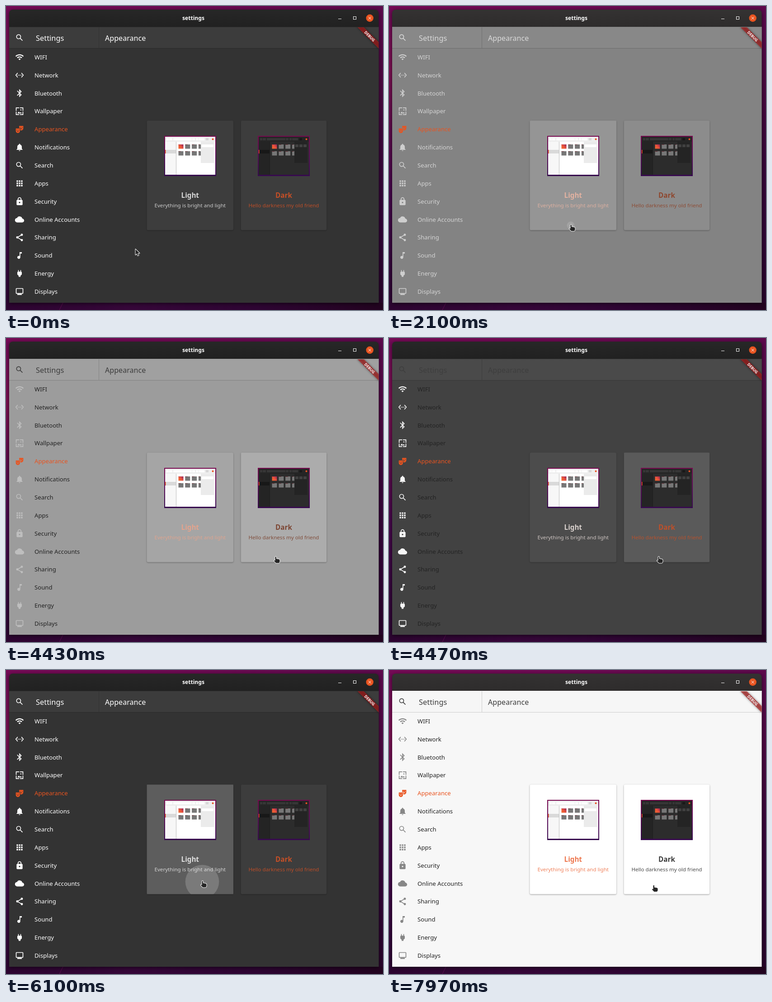
Recreate the animation shown at these times as an HTML page with a canvas. Size 834 by 672 pixels, loop 8 s.

```html
<!DOCTYPE html>
<html lang="en">
<head>
<meta charset="utf-8">
<title>settings</title>
<style>
html, body { margin: 0; width: 100%; height: 100%; overflow: hidden; background: #2a0430; }
canvas { display: block; width: 834px; height: 672px; }
</style>
</head>
<body>
<canvas id="stage" width="834" height="672"></canvas>
<script>
const ctx = document.getElementById('stage').getContext('2d');
const LOOP = 8000;
const SCALE = 0.83;
const ORANGE = [233, 84, 32];
const FONT = '"Noto Sans", "Open Sans", sans-serif';

// Icons on a 24-unit grid: stroked path, filled path
const icons = {
  search: ['M15 9.5a5.5 5.5 0 1 0-11 0a5.5 5.5 0 1 0 11 0M13.6 13.6L19.8 19.8', ''],
  wifi: ['', 'M1 9l2 2c4.97-4.97 13.03-4.97 18 0l2-2C16.93 2.93 7.08 2.93 1 9zM9 17l3 3 3-3c-1.65-1.66-4.34-1.66-6 0zM5 13l2 2c2.76-2.76 7.24-2.76 10 0l2-2C15.14 9.14 8.87 9.14 5 13z'],
  network: ['M7 6.1L2.1 12L7 17.9M17 6.1L21.9 12L17 17.9M7 12h2m2 0h2m2 0h2', ''],
  bluetooth: ['M5.7 5.7L16.3 16.3L12 20.6V3.4L16.3 7.7L5.7 18.3', ''],
  wallpaper: ['M3 11V3h8M13 3h8v8M21 13v8h-8M11 21H3v-8', 'M10 13l-4 5h12l-3-4-2 2.7zM17 8.5a1.5 1.5 0 1 0-3 0a1.5 1.5 0 1 0 3 0'],
  masks: ['', 'M2 10h11v6.5a5.5 5.5 0 0 1-11 0zM5 17a2.5 1.5 0 0 0 5 0zM4 14a1 1 0 1 0 2 0a1 1 0 1 0-2 0M9 14a1 1 0 1 0 2 0a1 1 0 1 0-2 0' +
    'M11 3h11v6.5a5.5 5.5 0 0 1-8 4.9V9h-3zM14 11.5h5a2.5 1.5 0 0 0-5 0M13 7a1 1 0 1 0 2 0a1 1 0 1 0-2 0M18 7a1 1 0 1 0 2 0a1 1 0 1 0-2 0'],
  bell: ['', 'M10 20h4a2 2 0 0 1-4 0M18 16v-5c0-3.1-1.6-5.6-4.5-6.3V4a1.5 1.5 0 0 0-3 0v.7C7.6 5.4 6 7.9 6 11v5l-2 2v1h16v-1z'],
  apps: ['', [4, 10, 16].map(x => [4, 10, 16].map(y => `M${x} ${y}h4v4h-4z`).join('')).join('')],
  lock: ['M8 9V6a4 4 0 0 1 8 0v3', 'M6 8h12a2 2 0 0 1 2 2v10a2 2 0 0 1-2 2H6a2 2 0 0 1-2-2V10a2 2 0 0 1 2-2zM10 15a2 2 0 1 0 4 0a2 2 0 1 0-4 0'],
  cloud: ['', 'M19.4 10A7.5 7.5 0 0 0 5.4 8A6 6 0 0 0 6 20h13a5 5 0 0 0 .4-10z'],
  share: ['M18 5L6 12L18 19', [[18, 5], [6, 12], [18, 19]].map(([x, y]) => `M${x - 3} ${y}a3 3 0 1 0 6 0a3 3 0 1 0-6 0`).join('')],
  note: ['', 'M12 3v10.55a4 4 0 1 0 2 3.45V7h4V3z'],
  plug: ['', 'M16 7V3h-2v4h-4V3H8v4a2 2 0 0 0-2 2v5.5L9.5 18v3h5v-3l3.5-3.5V9a2 2 0 0 0-2-2z'],
  display: ['M4 4h16a1 1 0 0 1 1 1v11a1 1 0 0 1-1 1H4a1 1 0 0 1-1-1V5a1 1 0 0 1 1-1z', 'M7 18l-1 1v2h12v-2l-1-1z']
};
for (const name in icons) icons[name] = icons[name].map(d => new Path2D(d));

const rows = [
  ['wifi', 'WIFI'], ['network', 'Network'], ['bluetooth', 'Bluetooth'], ['wallpaper', 'Wallpaper'],
  ['masks', 'Appearance'], ['bell', 'Notifications'], ['search', 'Search'], ['apps', 'Apps'],
  ['lock', 'Security'], ['cloud', 'Online Accounts'], ['share', 'Sharing'], ['note', 'Sound'],
  ['plug', 'Energy'], ['display', 'Displays']
];

const arrow = new Path2D('M0 0V12.5L3 9.8L5 14.5L7 13.6L5 9H9z');
const hand = new Path2D('M3 8.5V1.5q1.2-1.6 2.4 0V5.5L11 6.5q2 .5 2 2V11q0 4-3 4H5.5q-1 0-2-1.5L.5 10.2q-.3-2 2.5-.8z');

// Keys are [time, value] pairs, held at both ends
function track(t, keys, ease = u => u) {
  if (t < keys[0][0]) return keys[0][1];
  for (let i = 1; i < keys.length; i++) {
    const [t0, v0] = keys[i - 1], [t1, v1] = keys[i];
    if (t < t1) return v0 + (v1 - v0) * ease((t - t0) / (t1 - t0));
  }
  return keys[keys.length - 1][1];
}
const smooth = u => u * u * (3 - 2 * u);
const rgb = (c, a = 1) => `rgba(${c.map(Math.round).join(',')},${a})`;
const gray = (v, a) => rgb([v, v, v], a);
const mix = (a, b, u) => a + (b - a) * u;
const mixRgb = (a, b, u) => a.map((v, i) => mix(v, b[i], u));

function rect(x, y, w, h, fill) {
  ctx.fillStyle = fill;
  ctx.fillRect(x, y, w, h);
}
function disc(x, y, r, fill) {
  ctx.fillStyle = fill;
  ctx.beginPath();
  ctx.arc(x, y, r, 0, 7);
  ctx.fill();
}
function gradient(x0, y0, x1, y1, ...colors) {
  const g = ctx.createLinearGradient(x0, y0, x1, y1);
  colors.forEach((c, i) => g.addColorStop(i / (colors.length - 1), c));
  return g;
}
function text(str, x, y, size, fill, weight = 400, align = 'left') {
  ctx.font = `${weight} ${size}px ${FONT}`;
  ctx.textAlign = align;
  ctx.fillStyle = fill;
  ctx.fillText(str, x, y);
}
function icon(name, cx, cy, color) {
  const [line, solid] = icons[name];
  ctx.save();
  ctx.translate(cx, cy);
  ctx.scale(SCALE, SCALE);
  ctx.translate(-12, -12);
  ctx.strokeStyle = ctx.fillStyle = color;
  ctx.lineWidth = 2;
  ctx.stroke(line);
  ctx.fill(solid, 'evenodd');
  ctx.restore();
}

// dark: surface blend, ink: text blend (1 = dark theme)
function stateAt(t) {
  const late = t >= 7370;
  const held = late && t < 7470;
  return {
    dark: late ? (held ? 0.35 : 0) : track(t, [[2040, 1], [2100, 0.6], [2170, 0.1], [2200, 0], [4400, 0], [4430, 0.45], [4470, 0.92], [4500, 1]]),
    ink: late ? (held ? 0.9 : 0) : track(t, [[2070, 1], [2230, 0], [4470, 0], [4670, 1]]),
    bar: t < 2070 || (t >= 4430 && t < 7370),
    hoverLight: track(t, [[1130, 0], [1230, 1], [2700, 1], [2790, 0], [5290, 0], [5390, 1], [7830, 1], [7970, 0]]),
    hoverDark: track(t, [[2770, 0], [2870, 1], [5200, 1], [5310, 0]]),
    press: track(t, [[5900, 0], [6100, 0.085], [6500, 0.15], [7370, 0.15], [7470, 0]])
  };
}

function drawWallpaper() {
  rect(0, 0, 834, 672, gradient(0, 0, 834, 0, '#740a55', '#6c0a52', '#5c094b'));
  rect(0, 8, 400, 664, gradient(0, 8, 0, 672, '#6e0a55', '#7a0f50', '#5c0a4a', '#45064a', '#36063d', '#2a0430'));
  rect(400, 8, 434, 664, gradient(0, 8, 0, 672, '#5a094c', '#49083f', '#360638', '#2e0534', '#260328'));
  rect(0, 656, 834, 16, gradient(0, 0, 834, 0, '#2c0430', '#350638', '#2d0432', '#22031f'));
  ctx.strokeStyle = '#5d0c50';
  ctx.lineWidth = 1;
  ctx.beginPath();
  ctx.moveTo(118, 672);
  ctx.lineTo(126, 656);
  ctx.stroke();
}

function drawFrame(s) {
  ctx.save();
  ctx.shadowColor = 'rgba(0,0,0,.55)';
  ctx.shadowBlur = 9;
  ctx.shadowOffsetY = 2;
  ctx.beginPath();
  ctx.roundRect(7, 8, 817.5, 648, [8, 8, 0, 0]);
  ctx.fillStyle = s.bar ? gradient(0, 8, 0, 46, '#272727', '#212121') : gradient(0, 8, 0, 46, '#343232', '#2e2c2c');
  ctx.fill();
  ctx.restore();
  text('settings', 414.5, 31, 12.1, '#fff', 700, 'center');
  rect(735, 28, 7, 1, '#fff');
  ctx.lineWidth = 1;
  ctx.strokeStyle = '#fff';
  ctx.strokeRect(768.5, 23.5, 6, 6);
  disc(804.7, 26.8, 8.2, rgb(ORANGE));
  ctx.beginPath();
  for (const k of [-1, 1]) {
    ctx.moveTo(801.7, 26.8 - 3 * k);
    ctx.lineTo(807.7, 26.8 + 3 * k);
  }
  ctx.stroke();
}

function drawHeader(s) {
  const fill = gray(mix(246, 60, s.dark));
  const ink = gray(mix(61, 255, s.ink));
  rect(7, 46, 817.5, 47.5, fill);
  rect(7, 46, 817.5, 1, gray(mix(250, 46, s.dark)));
  rect(7, 93, 817.5, 1, gray(mix(205, 42, s.dark)));
  rect(205, 47, 1, 46, gray(mix(205, 50, s.dark)));
  icon('search', 30, 70, ink);
  text('Settings', 66, 76.5, 16.4, ink);
  text('Appearance', 219, 76.5, 16.1, ink);
}

function drawList(s) {
  const ink = gray(mix(34, 255, s.ink));
  const iconInk = gray(mix(135, 255, s.dark));
  rows.forEach(([name, label], i) => {
    const y = 113 + i * 39.86;
    const active = i === 4;
    icon(name, 30, y, active ? rgb(ORANGE) : iconInk);
    text(label, 63, y + 4.8, 13.15, active ? rgb(ORANGE) : ink, 500);
  });
}

function drawPreview(x, y, night) {
  const c = (day, dusk) => gray(night ? dusk : day);
  rect(x, y, 115, 89, gradient(0, y, 0, y + 89, '#78094f', '#5a0a58', '#360a4e'));
  rect(x + 2, y + 2, 111, 84, c(255, 44));
  rect(x + 2, y + 2, 111, 11, c(238, 37));
  for (const [dx, w] of [[5, 5], [11, 7], [20, 41], [62, 6], [70, 5], [76, 13]]) {
    rect(x + dx, y + 5, w, 5, c(255, 54));
  }
  rect(x + 92, y + 5, 6, 5, c(215, 24));
  disc(x + 107.5, y + 7.5, 2, rgb(ORANGE));
  rect(x + 2, y + 13, 24, 73, c(247, 36));
  rect(x + 26, y + 13, 1, 73, c(190, 30));
  rect(x + 2, y + 31, 24, 8, c(217, 24));
  rect(x + 2, y + 31, 1.5, 8, rgb(ORANGE));
  for (let i = 0; i < 8; i++) {
    const fx = x + 31.5 + (i % 4) * 14.8, fy = y + 19 + (i >> 2) * 15;
    const w = i % 4 === 3 ? 6 : 11;
    rect(fx, fy, w, 9.5, i ? '#777' : gradient(fx, fy + 9, fx + 11, fy, '#f06a30', '#e9523a', '#8c1f60'));
    rect(fx, fy, w / 2, 1, i ? '#6a3038' : '#b8354a');
  }
  rect(x + 81, y + 13, 29, 47, c(235, 36));
  if (night) for (let i = 0; i < 3; i++) rect(x + 83 + i * 9, y + 19, 7, 6, '#414141');
  else rect(x + 83, y + 19, 26, 6, '#fff');
}

function drawCard(s, x, w, title, note, night, hover, press, ripple) {
  const y = 253.3, h = 242.2, mid = x + w / 2;
  ctx.save();
  ctx.shadowColor = gray(0, mix(0.38, 0.3, s.dark));
  ctx.shadowBlur = 3;
  ctx.shadowOffsetY = 1;
  ctx.beginPath();
  ctx.roundRect(x, y, w, h, 3);
  ctx.fillStyle = gray(mix(255, 61, s.dark));
  ctx.fill();
  ctx.restore();

  const tone = s.dark > 0.3 ? 255 : 0;
  const wash = hover * (tone ? 0.08 : 0.058) + press;
  if (wash > 0) rect(x, y, w, h, gray(tone, wash));
  if (ripple && ripple.a > 0 && ripple.r > 0) {
    ctx.save();
    ctx.beginPath();
    ctx.rect(x, y, w, h);
    ctx.clip();
    disc(ripple.x, ripple.y, ripple.r, gray(tone, ripple.a));
    ctx.restore();
  }
  drawPreview(night ? 557 : 350, 287, night);

  const chosen = mixRgb(night ? [10, 10, 10] : ORANGE, night ? ORANGE : [255, 255, 255], s.dark);
  text(title, mid, 423.7, 15.2, rgb(chosen, 0.8), 700, 'center');
  text(note, mid, 445, 11.6, rgb(chosen, 0.74), 400, 'center');
}

function drawBanner() {
  ctx.save();
  ctx.beginPath();
  ctx.rect(7, 47, 817.5, 609);
  ctx.clip();
  ctx.translate(824.5, 47);
  ctx.rotate(Math.PI / 4);
  ctx.scale(SCALE, SCALE);
  ctx.filter = 'blur(2.5px)';
  rect(-40, 28, 80, 12, 'rgba(0,0,0,.5)');
  ctx.filter = 'none';
  rect(-40, 28, 80, 12, 'rgba(183,28,28,.627)');
  text('DEBUG', 0, 37.7, 10.2, '#fff', 900, 'center');
  ctx.restore();
}

function pointerAt(t) {
  if (t < 2000) {
    return [
      track(t, [[270, 286], [340, 286], [430, 300], [570, 344], [730, 393], [1100, 393], [1200, 398]]),
      track(t, [[270, 537], [340, 548], [430, 557], [570, 540], [730, 497], [1100, 497], [1200, 482]])
    ];
  }
  if (t >= 7970) return [581, 474.5];
  if (t >= 7800) return [526, 471];
  if (t >= 7700) return [470, 468];
  return [
    track(t, [[2570, 398], [2900, 592], [5030, 592], [5470, 430]], smooth),
    track(t, [[5030, 482], [5470, 465]], smooth)
  ];
}

function drawPointer(t) {
  const [x, y] = pointerAt(t);
  const inGap = x + 4 > 503 && x + 4 < 520;
  const shape = t < 1133 || inGap ? arrow : hand;
  ctx.save();
  ctx.translate(x + 0.5, y + 0.5);
  ctx.lineJoin = 'round';
  ctx.lineWidth = 1.9;
  ctx.strokeStyle = '#fff';
  ctx.stroke(shape);
  ctx.fillStyle = '#262626';
  ctx.fill(shape);
  ctx.restore();
}

function lightRipple(t) {
  if (t >= 1700 && t < 2230) {
    return { x: 402, y: 485, r: 8.5, a: track(t, [[2070, 0.17], [2200, 0]]) };
  }
  return {
    x: 434, y: 468,
    r: track(t, [[5900, 0], [6100, 37], [6500, 153], [7200, 154], [7230, 165]]),
    a: track(t, [[5900, 0.18], [7230, 0.148], [7370, 0.148], [7470, 0]])
  };
}
const darkRipple = t => ({
  x: 597, y: 484,
  r: track(t, [[3570, 0], [3730, 43], [4400, 50]]),
  a: track(t, [[3570, 0.03], [3730, 0.02], [4400, 0]])
});

function draw(t) {
  const s = stateAt(t);
  drawWallpaper();
  drawFrame(s);
  rect(7, 46, 817.5, 610, gray(mix(247, 51, s.dark)));
  drawHeader(s);
  drawList(s);
  drawCard(s, 311.5, 191.5, 'Light', 'Everything is bright and light', false, s.hoverLight, s.press, lightRipple(t));
  drawCard(s, 519.7, 189.5, 'Dark', 'Hello darkness my old friend', true, s.hoverDark, 0, darkRipple(t));
  drawBanner();
  drawPointer(t);
}

const start = performance.now();
function tick() {
  draw((performance.now() - start) % LOOP);
  requestAnimationFrame(tick);
}
tick();
</script>
</body>
</html>
```
